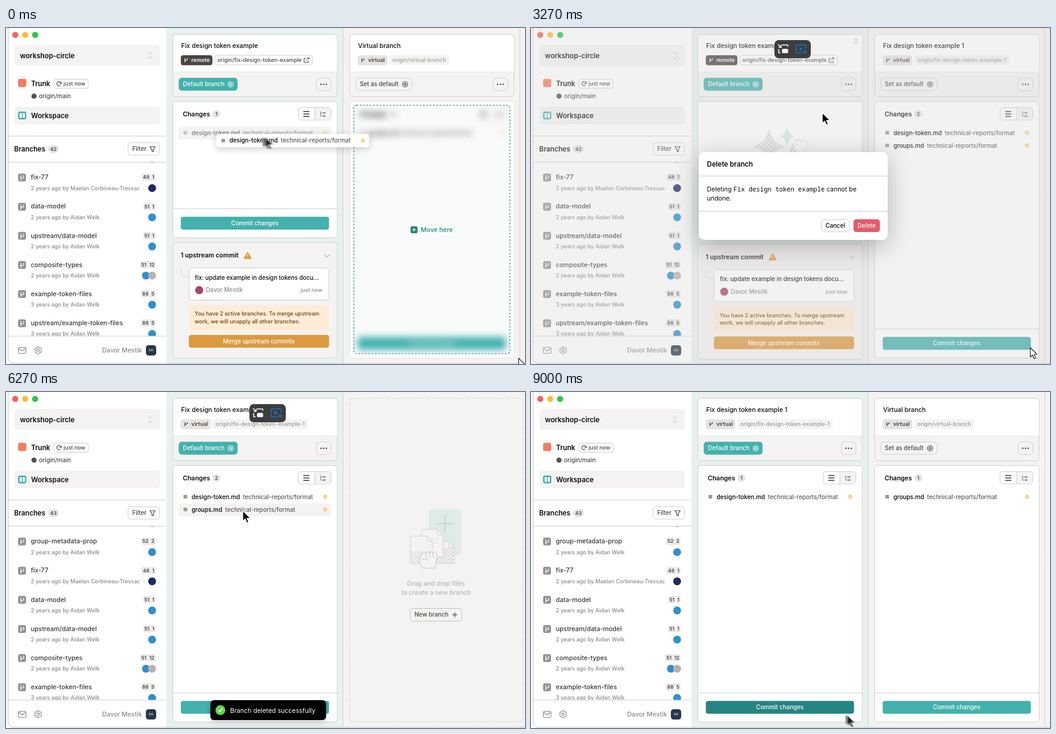
An HTML page with a canvas that plays this animation: 857 px wide and 555 px high, repeating every 9070 ms.

```html
<!DOCTYPE html>
<html lang="en">
<head>
<meta charset="utf-8">
<title>Branch workspace</title>
<style>
html, body { margin: 0; width: 100%; height: 100%; overflow: hidden; background: #fff; }
canvas { display: block; width: 857px; height: 555px; }
</style>
</head>
<body>
<canvas id="stage"></canvas>
<script>
const W = 857, H = 555, LOOP = 9070;
const canvas = document.getElementById('stage');
const dpr = Math.max(1, window.devicePixelRatio || 1);
canvas.width = W * dpr;
canvas.height = H * dpr;
const c = canvas.getContext('2d');

const S = 8.96, M = 9.72, L = 10.47, XL = 11.27;
const TEAL = '#43b1ad', DEEP = '#258583', LINE = '#d4d0ce', SOFT = '#f4f3f1',
      INK = '#0d0b0a', GREY = '#8d8986', PALE = '#b8b4b1', DARK = '#4b4542';
const AUTHOR = 'Davor Mestik', A = 'Aidan Welk', B = 'Maelan Corbineau-Tressac';

// Moments of hard change
const DROP1 = 640, DELETED = 4200, DROP2 = 7400;

const branches = [
  ['group-metadata-prop', 2, A, '52', '2'],
  ['fix-77', 2, B, '48', '1'],
  ['data-model', 2, A, '51', '1'],
  ['upstream/data-model', 2, A, '51', '1'],
  ['composite-types', 2, A, '51', '12'],
  ['example-token-files', 3, A, '88', '5'],
  ['upstream/example-token-files', 3, A, '88', '5']
];

const pointer = [
  [-100, 385, 177], [0, 429, 180], [520, 680, 225], [700, 690, 225], [950, 640, 195],
  [1130, 567, 151], [1450, 524, 93], [1950, 524, 93], [2500, 481, 140], [3330, 481, 140],
  [3700, 550, 325], [4150, 550, 325], [4380, 540, 319], [5000, 540, 319], [5800, 391, 196],
  [6600, 391, 196], [7130, 617, 205], [7330, 690, 216], [7800, 690, 216],
  [8350, 600, 330], [8700, 470, 516], [8900, 492, 521], [9000, 523, 534], [9070, 540, 545]
];

const clamp = (v) => Math.min(1, Math.max(0, v));
const ramp = (t, from, len) => clamp((t - from) / len);

function pointerAt(t) {
  let i = 1;
  while (i < pointer.length - 1 && pointer[i][0] < t) i++;
  const a = pointer[i - 1], b = pointer[i], k = ramp(t, a[0], b[0] - a[0]);
  return [a[1] + (b[1] - a[1]) * k, a[2] + (b[2] - a[2]) * k];
}

// Drawing helpers
function text(s, x, y, size, color, weight = 500, align = 'left', family = 'Inter, sans-serif') {
  c.font = `${weight} ${size}px ${family}`;
  c.fillStyle = color;
  c.textAlign = align;
  c.fillText(s, x, y + size * 0.36);
  return c.measureText(s).width;
}

function box(x, y, w, h, r, fill, stroke, lw = 1) {
  c.beginPath();
  c.roundRect(x, y, w, h, r);
  if (fill) { c.fillStyle = fill; c.fill(); }
  if (stroke) { c.strokeStyle = stroke; c.lineWidth = lw; c.stroke(); }
}

function disc(x, y, r, fill, stroke, lw = 1) {
  c.beginPath();
  c.arc(x, y, r, 0, 7);
  if (fill) { c.fillStyle = fill; c.fill(); }
  if (stroke) { c.strokeStyle = stroke; c.lineWidth = lw; c.stroke(); }
}

function path(points, color, lw = 1, fill, closed) {
  c.beginPath();
  for (let i = 0; i < points.length; i += 2) c.lineTo(points[i], points[i + 1]);
  if (closed || fill) c.closePath();
  if (fill) { c.fillStyle = fill; c.fill(); }
  if (color) { c.strokeStyle = color; c.lineWidth = lw; c.stroke(); }
}

function group(draw, { x = 0, y = 0, alpha = 1, scale = 1, filter } = {}) {
  c.save();
  c.translate(x, y);
  c.scale(scale, scale);
  c.globalAlpha *= alpha;
  if (filter) c.filter = filter;
  draw();
  c.restore();
}

function shadowBox(x, y, w, h, r, fill, blur, color, dy) {
  c.save();
  c.shadowBlur = blur * dpr;
  c.shadowColor = color;
  c.shadowOffsetY = dy * dpr;
  box(x, y, w, h, r, fill);
  c.restore();
}

function checker(x, y, w, h, size, color) {
  c.fillStyle = color;
  for (let j = 0; j * size < h; j++)
    for (let i = j % 2; i * size < w; i += 2) c.fillRect(x + i * size, y + j * size, size, size);
}

function branchMark(x, y, color) {
  path([x - 2, y + 3.5, x - 2, y - 3], color, 1.2);
  path([x - 2, y + 1, x + 2, y - 1, x + 2, y - 3], color, 1.2);
}

function count(n, x, y) {
  c.font = '600 8.2px Inter, sans-serif';
  const w = Math.max(13, c.measureText(n).width + 7);
  box(x, y - 6.5, w, 13, 6.5, '#e6e4e2');
  text(n, x + w / 2, y, 8.2, DARK, 600, 'center');
}

// Sidebar
function branchRow([name, years, who, ahead, files], y) {
  box(20, y - 6, 13, 13, 3, '#97928f');
  path([24.5, y + 5, 24.5, y - 3], '#fff', 1.2);
  path([24.5, y + 2, 29, y + 1, 29, y - 3], '#fff', 1.2);
  text(name, 41, y, L, '#3c3633');
  text(`${years} years ago by ${who}`, 41, y + 18, S, GREY);
  c.font = '600 8px Inter, sans-serif';
  const w2 = c.measureText(files).width + 4, w1 = c.measureText(ahead).width + 4;
  const split = 247 - w2;
  box(split, y - 6, w2, 12, [0, 3, 3, 0], '#eae8e6');
  box(split - 0.8 - w1, y - 6, w1, 12, [3, 0, 0, 3], '#eae8e6');
  text(files, split + w2 / 2, y, 8, DARK, 600, 'center');
  text(ahead, split - 0.8 - w1 / 2, y, 8, DARK, 600, 'center');
  if (files === '12') disc(231, y + 18, 6.5, '#2f8fd0');
  disc(241.3, y + 18, 6.5, who === B ? '#1c2a66' : files === '12' ? '#b9b3b0' : '#2f8fd0');
}

function sidebar(t) {
  const shifted = t >= DELETED;
  c.fillStyle = '#fff';
  c.fillRect(0, 0, 265, H);
  ['#fe5f57', '#febc2e', '#28c840'].forEach((f, i) => disc(15.3 + i * 16.4, 11.5, 5, f));
  box(14, 28, 240, 34.5, 5, SOFT);
  text('workshop-circle', 23, 45.5, 11.4, INK, 600);
  path([235, 43.5, 238, 40.5, 241, 43.5], PALE);
  path([235, 47.5, 238, 50.5, 241, 47.5], PALE);

  box(20, 84, 13.5, 13.5, 3, '#fa7a60');
  text('Trunk', 41.5, 92, XL, INK, 600);
  box(79, 84.5, 57, 15, 4, '#fff', LINE);
  c.beginPath();
  c.arc(87.5, 92, 3.4, 0.9, 6.1);
  c.strokeStyle = DARK;
  c.lineWidth = 1.1;
  c.stroke();
  path([88, 92, 91.4, 92, 91.4, 89], DARK);
  text('just now', 95, 92, S, DARK);
  disc(46.3, 112.5, 4.3, '#57514e');
  text('origin/main', 54.5, 112.5, M, DARK);

  box(14, 130, 240, 29, 5, SOFT);
  box(20, 138, 13.5, 13, 3, TEAL);
  box(22.5, 140.5, 3.6, 8, 1, '#fff');
  box(27.5, 140.5, 3.6, 8, 1, '#fff');
  text('Workspace', 41.5, 144.5, XL, INK, 600);

  text('Branches', 13.5, 200, XL, INK, 600);
  count(shifted ? '43' : '42', 69.5, 200);
  box(201.5, 189.5, 52, 20.5, 4.5, '#fff', LINE);
  text('Filter', 208.5, 199.7, M, DARK);
  path([237.5, 196, 246.5, 196, 243.3, 200.3, 243.3, 204.5, 240.7, 203, 240.7, 200.3], DARK, 1.1, null, true);

  c.save();
  c.beginPath();
  c.rect(0, 221.5, 264, 287.5);
  c.clip();
  const first = shifted ? 0 : 1;
  disc(241.3, 216.2, 6.5, shifted ? '#2f8fd0' : '#35b3a6');
  branches.slice(first).forEach((b, i) => branchRow(b, 246.5 + i * 48.15));
  c.restore();

  for (const y of [178.5, 221.5, 509]) path([4, y, 264, y], LINE);
  box(20.5, 527.5, 12.5, 10, 1.5, null, GREY, 1.1);
  path([21, 529, 26.7, 533.5, 32.5, 529], GREY, 1.1);
  path([53, 526.3, 58.2, 529.3, 58.2, 535.3, 53, 538.3, 47.8, 535.3, 47.8, 529.3], GREY, 1.1, null, true);
  disc(53, 532.3, 2.2, null, GREY, 1.1);
  text(AUTHOR, 224.5, 532.3, L, GREY, 500, 'right');
  box(231, 524, 17, 17, 4.5, '#26394a');
  text('DA', 239.5, 532.5, 5, '#c7d5df', 600, 'center');
  box(3.5, -8, 870, 562, 9, null, '#c9c7c5');
}

// Lane parts, in the coordinates of the first lane
function header({ title, remote, ref, main }) {
  box(275.5, 10.5, 271.5, 103, 5, SOFT, LINE);
  box(276, 11, 270.5, 61.5, [5, 5, 0, 0], '#fff');
  path([276, 72.5, 547, 72.5], '#ebe9e7');
  text(title, 289.3, 29, L, INK);

  c.font = `500 ${S}px Inter, sans-serif`;
  const chip = remote ? 'remote' : 'virtual', w = c.measureText(chip).width + 22;
  box(288.7, 45, w, 16.5, 4, remote ? DARK : '#e6e4e2');
  branchMark(297.5, 53, remote ? '#fff' : DARK);
  text(chip, 306, 53, S, remote ? '#fff' : DARK, 600);
  const rx = 288.7 + w + (remote ? 4 : 3.5);
  c.font = `500 ${S}px Inter, sans-serif`;
  const rw = c.measureText(ref).width + (remote ? 22 : 10);
  box(rx, 45, rw, 16, 4, remote ? '#fff' : SOFT, remote ? LINE : null);
  text(ref, rx + (remote ? 4.2 : 5), 53, S, remote ? DARK : '#a09c99');
  if (remote) {
    const ex = rx + rw - 10;
    path([ex - 1, 50, ex - 4, 50, ex - 4, 57, ex + 3, 57, ex + 3, 54], DARK);
    path([ex - 1, 54, ex + 4, 49], DARK);
    path([ex + 1, 49, ex + 4, 49, ex + 4, 52], DARK);
  }

  if (main) box(285.2, 82.2, 97.2, 21.3, 5, TEAL);
  else box(285.5, 82.5, 93, 20.5, 5, SOFT, LINE);
  text(main ? 'Default branch' : 'Set as default', 292.3, 93, M, main ? '#fff' : DARK);
  const ix = main ? 371 : 367, ic = main ? '#fff' : DARK;
  disc(ix, 93, 4.3, null, ic, 1.1);
  disc(ix, 93, 1.7, null, ic, 1.2);
  box(512.5, 82.5, 24, 21, 5, SOFT, LINE);
  for (const x of [520, 524.5, 529]) disc(x, 93, 1.2, DARK);
}

function fileRow(name, y, faded, hover) {
  if (faded || hover) box(285, y - 10, 252, 21, 3, SOFT);
  group(() => {
    box(293.2, y - 3, 6, 6, 0.8, '#a3978e');
    const w = text(name, 306.5, y, 9.8, '#000');
    text('technical-reports/format', 306.5 + w + 5, y, 9.8, '#5f5955');
    disc(527, y, 3.5, '#f8d58b');
  }, { alpha: faded ? 0.5 : 1 });
}

function commitButton(y, fill = TEAL) {
  box(288.7, y, 244.7, 21.2, 4, fill);
  text('Commit changes', 411, y + 10.7, M, '#fff', 500, 'center');
}

function viewToggle() {
  box(482.5, 131.5, 54, 20.5, 4.5, '#fff', LINE);
  box(510, 132, 26, 19.5, [0, 4, 4, 0], SOFT);
  path([510, 132, 510, 152], LINE);
  for (const y of [138, 142, 146]) path([491, y, 501, y], INK, 1.2);
  path([519.5, 137.5, 519.5, 145.5, 523, 145.5], GREY);
  path([519.5, 140.5, 523, 140.5], GREY);
  box(523.5, 139, 4, 2.6, 0.5, GREY);
  box(523.5, 144.2, 4, 2.6, 0.5, GREY);
}

function panel(bottom, border = LINE) {
  box(275.5, 121.5, 271.5, bottom - 121.5, 5, '#fff', border);
}

function changes(files, bottom, { faded, hover, button } = {}) {
  panel(bottom);
  text('Changes', 292, 142, L, INK, 600);
  count(String(files.length), 341, 142);
  viewToggle();
  files.forEach((f, i) => fileRow(f, 173 + i * 21, faded === f, hover === f));
  path([276, bottom - 48, 547, bottom - 48], LINE);
  commitButton(bottom - 34.7, button);
}

function star(x, y, rx, ry) {
  c.beginPath();
  c.moveTo(x, y - ry);
  const k = 0.16;
  for (const [ex, ey, qx, qy] of [[rx, 0, 1, -1], [0, ry, 1, 1], [-rx, 0, -1, 1], [0, -ry, -1, -1]])
    c.quadraticCurveTo(x + qx * rx * k, y + qy * ry * k, x + ex, y + ey);
  c.closePath();
}

function checkStar(x, y, rx, ry) {
  c.save();
  star(x, y, rx, ry);
  c.fillStyle = '#f4f3f2';
  c.fill();
  c.clip();
  checker(x - rx, y - ry, rx * 2, ry * 2, 4, '#dfddda');
  c.restore();
  star(x, y, rx, ry);
  c.strokeStyle = '#dedbd9';
  c.lineWidth = 0.8;
  c.stroke();
}

function emptyPanel() {
  panel(349.5);
  c.beginPath();
  c.ellipse(413, 211, 49, 16, -0.46, -0.9, 3.5);
  c.strokeStyle = '#dedbd9';
  c.lineWidth = 1;
  c.stroke();
  checkStar(393, 196, 26, 29);
  checkStar(432, 213, 18, 23);
  star(423, 179, 12, 16);
  c.fillStyle = '#d3ecea';
  c.fill();
  disc(404, 218, 2.5, '#eceae8');
  text('This is a new branch.', 411, 265.5, 12.08, '#48423f', 600, 'center');
  text('You can drag and drop files or parts', 411, 288.5, L, PALE, 500, 'center');
  text('of files here.', 411, 303, L, PALE, 500, 'center');
}

function upstream(y) {
  box(275.5, y, 271.5, 191, 5, SOFT, LINE);
  text('1 upstream commit', 288.5, y + 21.5, L, INK, 600);
  path([399, y + 17, 404.3, y + 26.5, 393.7, y + 26.5], '#db9a3f', 2, '#db9a3f', true);
  path([399, y + 19.5, 399, y + 23.3], '#fff', 1.2);
  disc(399, y + 25.4, 0.7, '#fff');
  path([526, y + 20.5, 530, y + 24.5, 534, y + 20.5], PALE, 1.1);
  c.beginPath();
  c.moveTo(289, y + 42);
  c.lineTo(289, y + 50);
  c.quadraticCurveTo(289, y + 57, 296, y + 57);
  c.lineTo(302, y + 57);
  c.strokeStyle = LINE;
  c.lineWidth = 1;
  c.stroke();
  box(302.5, y + 42.5, 230.5, 53, 5, '#fff', LINE);
  text('fix: update example in design tokens docu...', 312, y + 58.5, M, INK);
  disc(319, y + 79, 6.7, '#a8476a');
  text(AUTHOR, 330, y + 79, M, GREY);
  text('just now', 522.5, y + 79, S, GREY, 500, 'right');
  box(302, y + 104, 231.5, 42, 5, '#feecd6');
  text('You have 2 active branches. To merge upstream', 311.5, y + 118, S, '#6a4312');
  text('work, we will unapply all other branches.', 311.5, y + 130.5, S, '#6a4312');
  box(302, y + 153, 231.5, 21, 4, '#db9a3f');
  text('Merge upstream commits', 417.5, y + 163.7, M, '#fff', 500, 'center');
}

function dashed(x, y, w, h, fill, stroke) {
  c.save();
  c.setLineDash([3, 2.5]);
  box(x, y, w, h, 4, fill, stroke, 1.1);
  c.restore();
}

function paper(x, y, w, h) {
  path([x, y, x + w - 9, y, x + w, y + 9, x + w, y + h, x, y + h], '#d0cdca', 0.9, '#f4f3f1');
  path([x + w - 9, y, x + w - 9, y + 9, x + w, y + 9], '#d0cdca', 0.9);
}

function fist() {
  c.beginPath();
  c.moveTo(688, 291);
  c.bezierCurveTo(681, 284, 681, 271, 687, 268);
  for (let x = 687; x < 711; x += 6) c.quadraticCurveTo(x + 3, 261, x + 6, 267);
  c.bezierCurveTo(713, 277, 709, 283, 708, 291);
  c.closePath();
  c.fillStyle = SOFT;
  c.fill();
  c.strokeStyle = '#c6c3c0';
  c.lineWidth = 1;
  c.stroke();
  for (const x of [693, 699, 705]) path([x, 267, x + 0.5, 273], '#c6c3c0');
  path([687, 277, 695, 275, 698, 279], '#c6c3c0');
}

function dropArt(active) {
  const k = active ? 1 : 0, d = k * 9;
  box(698 - k * 4, 193 + d, 54 + k * 9, 77, 8, active ? '#d6e9e6' : '#dfebe8');
  const px = 725, py = 217.5 + k * 2, plus = active ? '#8fc4bf' : '#a9cfcb';
  path([px - 14, py, px + 14, py], plus, 1.2);
  path([px, py - 14, px, py + 14], plus, 1.2);
  group(() => {
    paper(711 - k * 5, 247, 29, 36);
    checker(712 - k * 5, 257, 27, 25, 3, '#dcd9d6');
    paper(686, 227 + k * 3, 36, 45);
    for (let i = 0; i < 3; i++) path([692, 241 + i * 4, 714, 241 + i * 4], '#dedbd9', 0.8);
    paper(668, 238, 36, 45);
    checker(669, 263, 34, 19, 3, '#e4e1de');
    fist();
  }, { x: k * 2.5, y: d });
}

function newLane(active) {
  dashed(567.5, 10.5, 286, 534, active ? '#f0f3f1' : null, active ? '#65b0ad' : LINE);
  dropArt(active);
  const y = active ? 322.7 : 316.3;
  text('Drag and drop files', 710, y, L, PALE, 500, 'center');
  text('to create a new branch', 710, y + 14.7, L, PALE, 500, 'center');
  if (active) return;
  box(667.5, 357.5, 85.5, 21, 5, SOFT, '#c4c0bd');
  text('New branch', 674.5, 368, M, DARK);
  path([737, 368, 745, 368], DARK, 1.2);
  path([741, 364, 741, 372], DARK, 1.2);
}

function dropZone() {
  panel(545, '#e4e6e4');
  c.save();
  c.beginPath();
  c.rect(282, 127, 258, 411);
  c.clip();
  c.fillStyle = '#f9fbfb';
  c.fillRect(282, 127, 258, 411);
  group(() => {
    text('Changes', 292, 142, L, INK, 700);
    count('1', 341, 142);
    viewToggle();
    fileRow('groups.md', 173);
    commitButton(510.3);
  }, { filter: `blur(${6 * dpr}px)` });
  c.restore();
  dashed(282.5, 127.5, 257.5, 410.5, null, DEEP);
  box(376, 327.5, 11.5, 11.5, 2.5, DEEP);
  path([379, 333.2, 384.5, 333.2], '#fff', 1.2);
  path([381.7, 330.5, 381.7, 336], '#fff', 1.2);
  text('Move here', 393, 333.2, L, DEEP);
}

function lanes(t, px, py) {
  c.fillStyle = SOFT;
  c.fillRect(265, 0, W, H);
  c.fillStyle = '#e7f1ef';
  c.fillRect(265, 0, 291.5, H);
  path([264.5, 0, 264.5, H], LINE);
  path([556.5, 0, 556.5, H], LINE);
  const right = { x: 292 }, name = 'Fix design token example';
  const ref = 'origin/fix-design-token-example';
  const dt = 'design-token.md', gr = 'groups.md';
  const two = t < DELETED || t >= DROP2;
  if (two) path([848.5, 0, 848.5, H], LINE);

  if (t < DELETED) {
    header({ title: name, remote: true, ref, main: true });
    if (t > 1400)
      for (let i = 0; i < 6; i++) disc(534.8 + (i % 2) * 3.5, 19 + (i >> 1) * 3.4, 0.9, '#a09c99');
    if (t < DROP1) {
      changes([dt], 346.5, { faded: dt });
      upstream(354);
      group(() => {
        header({ title: 'Virtual branch', ref: 'origin/virtual-branch' });
        dropZone();
      }, right);
    } else {
      emptyPanel();
      upstream(356.5);
      group(() => {
        header({ title: name + ' 1', ref: ref + '-1' });
        changes([dt, gr], 545);
      }, right);
    }
    return;
  }
  header({ title: name + ' 1', ref: ref + '-1', main: true });
  const dragging = t > 6700 && t < DROP2;
  if (!two) {
    const row = px > 285 && px < 537 && py > 162 && py < 205 ? (py < 183 ? dt : gr) : null;
    changes([dt, gr], 545, { faded: dragging ? gr : null, hover: dragging ? null : row });
    newLane(dragging);
  } else {
    changes([dt], 545, { button: t > 8720 ? DEEP : TEAL });
    group(() => {
      header({ title: 'Virtual branch', ref: 'origin/virtual-branch' });
      changes([gr], 545);
    }, right);
  }
}

// Floating layers
function ghost(name, x, y) {
  shadowBox(x, y, 252, 22, 4, '#fff', 12, 'rgba(0,0,0,.2)', 3);
  group(() => fileRow(name, 0), { x: x - 285, y: y + 10.8 });
}

function dialog(t) {
  const a = ramp(t, 2900, 150) * (1 - ramp(t, 3950, 100));
  if (!a) return;
  c.fillStyle = `rgba(214,214,214,${0.32 * a})`;
  c.fillRect(0, 0, W, H);
  group(() => {
    shadowBox(277, 205, 312, 145, 9, '#fff', 40, 'rgba(0,0,0,.25)', 10);
    text('Delete branch', 290.5, 225, XL, INK, 600);
    path([277, 244.5, 589, 244.5], LINE);
    path([277, 302.5, 589, 302.5], LINE);
    let x = 290.5;
    x += text('Deleting ', x, 266, L, INK, 400);
    x += text('Fix design token example', x, 266, L, INK, 400, 'left', '"Noto Sans Mono", monospace');
    text(' cannot be', x, 266, L, INK, 400);
    text('undone.', 290.5, 281.5, L, INK, 400);
    box(479.5, 316.5, 46, 20, 4.5, '#fff', LINE);
    text('Cancel', 502.5, 326.5, M, INK, 500, 'center');
    box(532.5, 316, 43.5, 21, 4.5, '#e8596b');
    text('Delete', 554.2, 326.5, M, '#fff', 500, 'center');
  }, { alpha: a });
}

function toast(t) {
  const start = 4278, end = 6300;
  if (t < start || t > end + 400) return;
  const inP = 1 - Math.pow(1 - ramp(t, start, 350), 3.5);
  const out = 1 - Math.pow(1 - ramp(t, end, 400), 3.5);
  const scale = 1 - 0.4 * (1 - inP) - 0.4 * out;
  group(() => {
    shadowBox(-95.5, -16.5, 191, 33, 6, '#000', 10, 'rgba(0,0,0,.15)', 3);
    c.beginPath();
    c.arc(-79, 0, 4.5, t / 160, t / 160 + 4.7);
    c.strokeStyle = '#e0e0e0';
    c.lineWidth = 1.5;
    c.stroke();
    const pop = ramp(t, start + 150, 300);
    if (pop) group(() => {
      disc(0, 0, 8.2, '#61d345');
      if (pop === 1) path([-3.5, 0.2, -1, 3, 3.5, -3], '#fff', 1.8);
    }, { x: -79, scale: pop });
    text('Branch deleted successfully', -63, 0.3, 10.55, '#fff', 400);
  }, { x: 433, y: 525.5 + (1 - inP) * 66 + out * 49.5, scale, alpha: (0.5 + 0.5 * inP) * (1 - out) });
}

function pipBar() {
  box(402, 20, 60, 30, 7, '#3d3d3d');
  path([424, 28, 424, 31], '#fff', 1.5);
  path([414, 28, 424, 28], '#fff', 1.5);
  path([409, 35, 409, 41, 412, 41], '#fff', 1.5);
  box(414.5, 34.5, 10, 7, 1.5, '#fff');
  path([408, 27, 413, 32], '#fff', 1.5);
  path([413, 28, 413, 32, 409, 32], '#fff', 1.5);
  path([449, 41, 438, 41, 438, 28, 454, 28, 454, 34], '#1a6fc0', 1.6);
  path([443.5, 31, 449, 34.5, 443.5, 38], null, 1, '#1a6fc0');
  star(452.5, 39.5, 4, 4);
  c.fillStyle = '#1a6fc0';
  c.fill();
}

function arrow(x, y, fill, stroke, scale = 1) {
  const shape = [0, 0, 0, 15.5, 3.6, 12.2, 6.1, 18, 8.7, 16.9, 6.2, 11.2, 11, 11];
  group(() => path(shape, stroke, 1.1, fill), { x, y, scale });
}

function cursor(t, x, y) {
  const [bx, by] = pointerAt(t - 30);
  const mark = (k) => arrow(x + (bx - x) * k, y + (by - y) * k, '#000', '#fff', 1.12);
  if (Math.hypot(x - bx, y - by) < 5) return mark(0);
  for (let i = 4; i >= 0; i--) group(() => mark(i / 8), { alpha: 0.35 });
}

function draw(t) {
  c.setTransform(dpr, 0, 0, dpr, 0, 0);
  c.lineJoin = 'round';
  c.fillStyle = '#fff';
  c.fillRect(0, 0, W, H);
  const [x, y] = pointerAt(t);
  lanes(t, x, y);
  sidebar(t);
  dialog(t);
  toast(t);
  if (t < DROP1) ghost('design-token.md', x - 82, y - 5);
  if (t > 6700 && t < DROP2) ghost('groups.md', x - 88, y - 17);
  if (t > 400 && t < 7800) pipBar();
  cursor(t, x, y);
  if (t < 4600) {
    const k = ramp(t, 60, 440), drift = 1.5 * ramp(t, 4200, 200);
    arrow(846.5 - 22 * k - drift, 545.5 - 17.5 * k - drift, '#fff', '#222');
  }
}

function loop() {
  draw(performance.now() % LOOP);
  requestAnimationFrame(loop);
}
loop();
</script>
</body>
</html>
```
